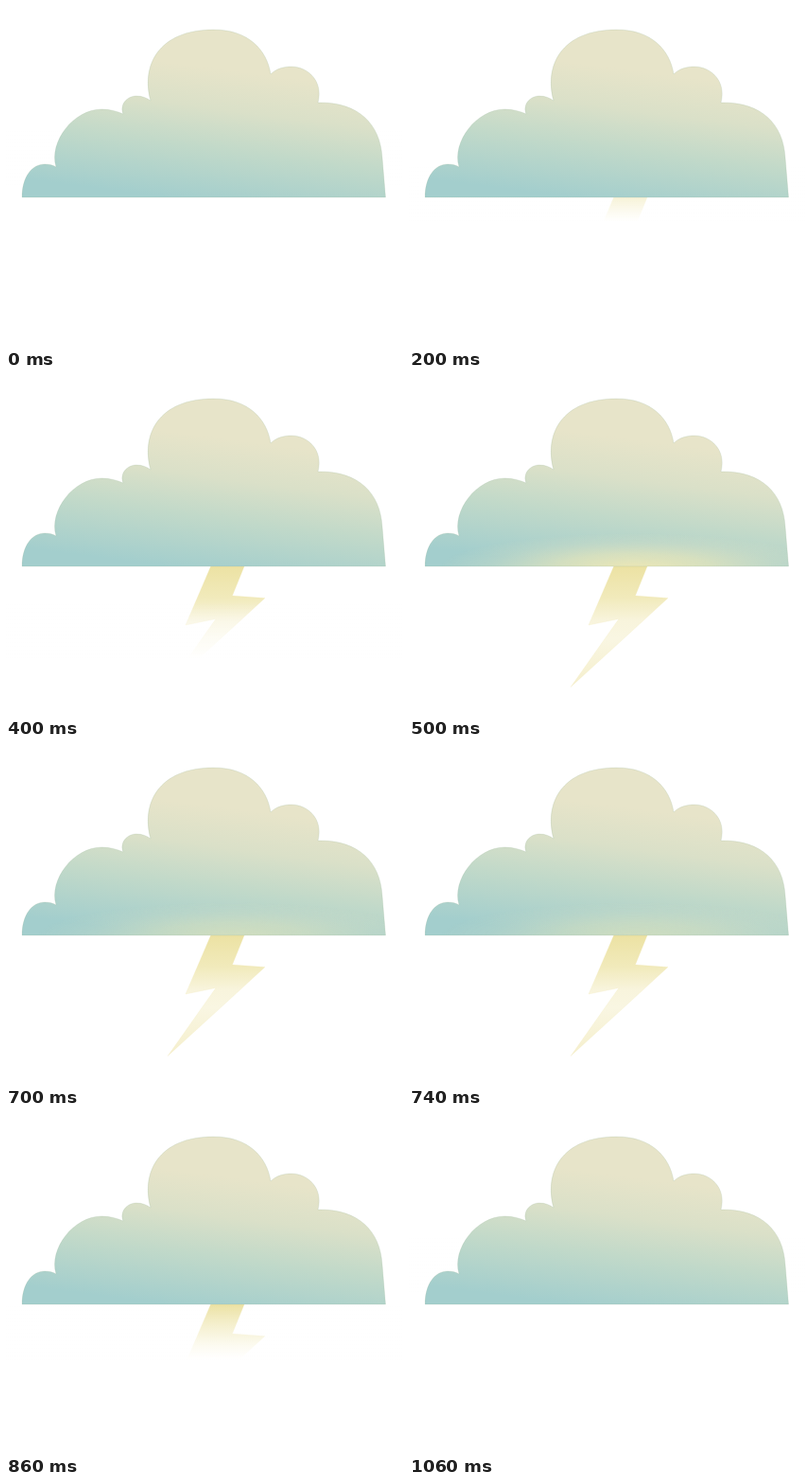
Animation of 420 by 360 pixels, one loop 1.26 s. Source, as an HTML page:

```html
<!DOCTYPE html>
<html lang="en">
<head>
<meta charset="utf-8">
<title>Cloud and lightning</title>
<style>
  html, body { margin: 0; width: 100%; height: 100%; overflow: hidden; background: #fff; }
  svg { display: block; width: 420px; height: 360px; }
  .veil { animation: reveal 1260ms step-end infinite; }
  .glow { animation: glow 1260ms step-end infinite; }

  /* The white veil slides down to uncover the bolt, then back up. */
  @keyframes reveal {
    0%     { transform: translateY(130px); }
    15.87% { transform: translateY(168px); }
    23.80% { transform: translateY(202px); }
    31.74% { transform: translateY(240px); }
    39.68% { transform: translateY(360px); }
    60.31% { transform: translateY(240px); }
    68.25% { transform: translateY(202px); }
    76.19% { transform: translateY(168px); }
    84.12%, 100% { transform: translateY(130px); }
  }
  @keyframes glow {
    0%     { opacity: 0; }
    39.68% { opacity: 1; }
    55.55% { opacity: .62; }
    57.14% { opacity: .6; }
    58.73% { opacity: .58; }
    60.31%, 100% { opacity: 0; }
  }
</style>
</head>
<body>
<svg viewBox="0 0 420 360">
  <defs>
    <linearGradient id="sky" gradientUnits="userSpaceOnUse" x1="215" y1="65" x2="197" y2="205">
      <stop offset="0" stop-color="#e7e4c9"/>
      <stop offset=".3" stop-color="#dae0c8"/>
      <stop offset=".6" stop-color="#c1d9c9"/>
      <stop offset="1" stop-color="#a3cecd"/>
    </linearGradient>
    <linearGradient id="flash" gradientUnits="userSpaceOnUse" x1="0" y1="202" x2="0" y2="329">
      <stop offset="0" stop-color="#ece2a3"/>
      <stop offset=".26" stop-color="#f1eabb"/>
      <stop offset=".45" stop-color="#f8f4dc"/>
      <stop offset=".6" stop-color="#f9f6e2"/>
      <stop offset="1" stop-color="#f5efcc"/>
    </linearGradient>
    <linearGradient id="fade" gradientUnits="userSpaceOnUse" x1="0" y1="0" x2="0" y2="60">
      <stop offset="0" stop-color="#fff" stop-opacity="0"/>
      <stop offset="1" stop-color="#fff"/>
    </linearGradient>
    <radialGradient id="light">
      <stop offset="0" stop-color="#efe8b4" stop-opacity=".95"/>
      <stop offset=".4" stop-color="#ece7b8" stop-opacity=".65"/>
      <stop offset=".75" stop-color="#e6e4c0" stop-opacity=".22"/>
      <stop offset="1" stop-color="#e6e4c0" stop-opacity="0"/>
    </radialGradient>
    <path id="cloud" d="M17 202C17 181 27 167 41 167C46 167 50 168 53 170C45 143 72 109 101 109C110 109 117 111 124 114C120 104 128 95 138 95C144 95 149 97 153 100C143 64 160 25 220 25C256 25 276 46 280 72C286 66 294 64 302 64C319 64 336 79 330 102C372 101 396 124 398 160L401.500 202Z"/>
    <clipPath id="inside"><use href="#cloud"/></clipPath>
  </defs>

  <path d="M217 201H252.500L239.500 233L274 235.500L171 329.500L222 257.500L190 264Z"
        fill="url(#flash)" stroke="#efe6b0" stroke-opacity=".4" stroke-width=".5"/>
  <rect class="veil" width="420" height="400" fill="url(#fade)"/>
  <use href="#cloud" fill="url(#sky)"/>
  <g clip-path="url(#inside)">
    <ellipse class="glow" cx="238" cy="203" rx="205" ry="36" fill="url(#light)"/>
  </g>
  <use href="#cloud" fill="none" stroke="#96b496" stroke-opacity=".3" stroke-width=".7"/>
</svg>
</body>
</html>
```
